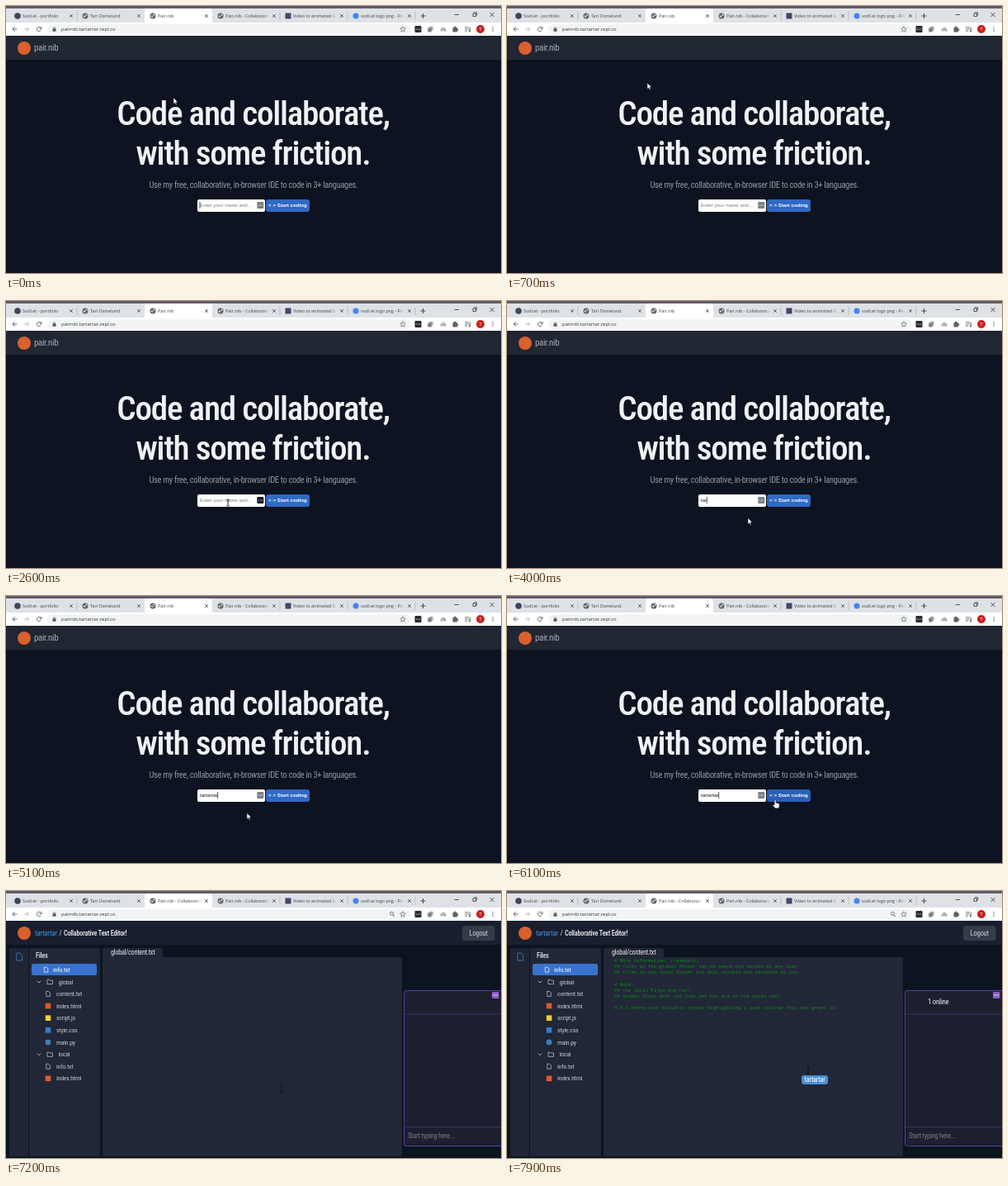
Animation, 600 px wide and 323 px high, one loop 8000 ms. Source, as an HTML page with a canvas:

```html
<!DOCTYPE html>
<html lang="en">
<head>
<meta charset="utf-8">
<title>Browser demo</title>
<style>
html, body { margin: 0; width: 100%; height: 100%; overflow: hidden; background: #0e1321; }
canvas { display: block; width: 600px; height: 323px; }
</style>
</head>
<body>
<canvas id="stage"></canvas>
<script>
const W = 600, H = 323, LOOP = 8000;
const BAR_Y = 20, PAGE_Y = 36;
const OPEN_AT = 7200, LOAD_AT = 6600, TYPE_AT = 3700, KEY_MS = 150;
const USER = 'tartartar', HOST = 'pairnib.' + USER + '.repl.co';
const UI = '"Open Sans", "Noto Sans", sans-serif';
const SANS = '"Liberation Sans", Arial, sans-serif';
const MONO = '"Liberation Mono", monospace';
const NARROW = '"Roboto Condensed", Roboto, sans-serif';
const TITLE = ['Code and collaborate,', 'with some friction.'];

const cv = document.getElementById('stage');
const dpr = window.devicePixelRatio || 1;
cv.width = W * dpr;
cv.height = H * dpr;
const c = cv.getContext('2d');

// time, x, y of the pointer
const PATH = [
  [0, 203, 111], [300, 203, 111], [1100, 137, 75], [1700, 137, 75],
  [2400, 269, 244], [2800, 269, 244], [3200, 292, 262.5], [5600, 292, 262.5],
  [5800, 296, 266], [6250, 334, 239.3], [7200, 334, 239.3], [7800, 365, 217]
];

function box(x, y, w, h, color, r = 0) {
  c.fillStyle = color;
  c.beginPath();
  c.roundRect(x, y, w, h, r);
  c.fill();
}

function disc(x, y, r, color) {
  c.fillStyle = color;
  c.beginPath();
  c.arc(x, y, r, 0, 7);
  c.fill();
}

// pts: flat x, y list
function line(pts, color, w = 0.9, close = false) {
  c.beginPath();
  for (let i = 0; i < pts.length; i += 2) c.lineTo(pts[i], pts[i + 1]);
  if (close) c.closePath();
  c.strokeStyle = color;
  c.lineWidth = w;
  c.stroke();
}

function ring(x, y, r, color, w = 0.9, from = 0, to = 7) {
  c.beginPath();
  c.arc(x, y, r, from, to);
  c.strokeStyle = color;
  c.lineWidth = w;
  c.stroke();
}

function text(s, x, y, size, color, family = UI, weight = 400, align = 'left') {
  c.font = `${weight} ${size}px ${family}`;
  c.textAlign = align;
  c.fillStyle = color;
  c.fillText(s, x, y);
}

function narrow(s, x, y, size, color, weight = 400, align = 'left') {
  const px = size * narrowScale;
  c.fontStretch = 'semi-condensed';
  c.letterSpacing = -0.03 * px + 'px';
  text(s, x, y, px, color, NARROW, weight, align);
  c.letterSpacing = '0px';
  c.fontStretch = 'normal';
}

// Font size factor for whichever narrow face is available.
function measureNarrow() {
  c.fontStretch = 'semi-condensed';
  c.font = `500 100px ${NARROW}`;
  const em = c.measureText(TITLE[0]).width / 100 - 0.03 * TITLE[0].length;
  c.fontStretch = 'normal';
  return 332 / em / 42;
}
let narrowScale = 1;

function cross(x, y, r, color, w) {
  line([x - r, y - r, x + r, y + r], color, w);
  line([x + r, y - r, x - r, y + r], color, w);
}

function dots(x, y, gap, color, r = 0.7) {
  for (let i = -1; i < 2; i++) disc(x + i * gap, y, r, color);
}

function globe(x, y) {
  disc(x, y, 3.5, '#5f6368');
  c.fillStyle = '#dfe2e6';
  c.beginPath();
  c.ellipse(x - 1.1, y + 0.6, 1.5, 0.9, 0.6, 0, 7);
  c.ellipse(x + 1.3, y - 1.2, 1.2, 0.8, 0.5, 0, 7);
  c.fill();
}

function tab(i, title, t) {
  const x = 82 * i, active = i === 2;
  const bg = active ? '#ffffff' : '#dee1e6';
  const loading = active && t >= LOAD_AT && t < OPEN_AT;
  if (active) box(168, 3, 82, BAR_Y - 2, bg, [3, 3, 0, 0]);
  if (loading) {
    const a = t / 130;
    ring(x + 14, 12, 3.2, '#6a62c8', 1, a, a + 3.6);
  } else if (i === 0) disc(14, 12, 3.8, '#3b4658');
  else if (i === 4) box(x + 10.5, 8.5, 7, 7, '#45456a');
  else if (i === 5) disc(x + 14, 12, 3.5, '#4285f4');
  else globe(x + 14, 12);
  c.save();
  c.beginPath();
  c.rect(x + 19, 4, 54, 15);
  c.clip();
  text(title, x + 20, 13.8, 5.4, '#3f4347');
  const fade = c.createLinearGradient(x + 66, 0, x + 73, 0);
  fade.addColorStop(0, bg + '00');
  fade.addColorStop(1, bg);
  c.fillStyle = fade;
  c.fillRect(x + 66, 4, 7, 15);
  c.restore();
  cross(x + 79, 12, 1.8, '#3c3f43', 0.8);
  if (i !== 1 && i !== 2) line([x + 86, 7, x + 86, 17], '#a3a6ab', 0.6);
}

function star(x, y) {
  const p = [];
  for (let i = 0; i < 10; i++) {
    const a = i * Math.PI / 5 - Math.PI / 2, r = i % 2 ? 1.6 : 3.5;
    p.push(x + r * Math.cos(a), y + r * Math.sin(a));
  }
  line(p, '#5f6368', 0.7, true);
}

function chrome(t) {
  const gray = '#55595e', open = t >= OPEN_AT;
  box(0, 0, W, BAR_Y, '#dee1e6');
  box(0, 0, W, 3, '#5f5c68');
  box(0, BAR_Y, W, PAGE_Y - BAR_Y, '#ffffff');
  const page = 'Pair.nib - Collaborative Text';
  const current = open ? page : t >= LOAD_AT ? 'https://' + HOST : 'Pair.nib';
  ['Sodl.et - portfolio', 'Tari Osmelund', current, page,
    'Video to animated G', 'sodl.et logo png - Find'].forEach((s, i) => tab(i, s, t));

  line([502.5, 12, 508.5, 12], '#44474b', 1);
  line([505.5, 9, 505.5, 15], '#44474b', 1);
  line([543.5, 10.5, 549, 10.5], '#333333', 0.8);
  line([566, 9, 569.5, 9, 569.5, 12.5, 566, 12.5], '#333333', 0.8, true);
  line([567, 7.8, 570.7, 7.8, 570.7, 11.5], '#333333', 0.7);
  cross(589, 10.5, 2.5, '#333333', 0.8);

  line([13.5, 28, 8, 28], gray);
  line([10.7, 25.3, 8, 28, 10.7, 30.7], gray);
  line([22, 28, 27.5, 28], '#b4b7bb');
  line([24.8, 25.3, 27.5, 28, 24.8, 30.7], '#b4b7bb');
  if (t >= LOAD_AT && t < OPEN_AT) cross(40, 28, 2.5, gray);
  else {
    ring(40, 28, 2.6, gray, 0.9, 0.5, 5.6);
    line([43, 25, 43, 27.5, 40.6, 27.5], gray);
  }

  box(50, 22.2, 441, 11.6, '#f1f3f4', 6);
  box(56.5, 27.2, 4, 3.6, gray, 0.4);
  ring(58.5, 27.2, 1.3, gray, 0.7, Math.PI, 2 * Math.PI);
  text(HOST, 67, 30.2, 6, '#2d3034');
  if (open) {
    ring(467.5, 27.3, 2, gray, 0.8);
    line([469, 29, 471, 31], gray);
  }
  star(481, 28.2);

  box(495.5, 24, 8, 8, '#2a2a33', 1);
  dots(499.5, 28, 2, '#ffffff', 0.6);
  box(513, 24.8, 4.6, 5, '#a4a8ad', 0.6);
  box(511.2, 26.4, 4.6, 5, '#7d8288', 0.6);
  disc(528, 29, 1.8, '#b4b7bb');
  disc(530.2, 27.8, 2.2, '#b4b7bb');
  disc(532, 29.2, 1.6, '#a6aaaf');
  box(541.5, 26, 5.5, 5.5, '#5f6368', 0.6);
  disc(544.2, 25.8, 1.2, '#5f6368');
  disc(547.2, 28.6, 1.2, '#5f6368');
  for (let i = 0; i < 3; i++) line([556, 25.8 + i * 2.2, i < 2 ? 561.5 : 559, 25.8 + i * 2.2], gray, 0.8);
  line([562.5, 26, 562.5, 30.5], gray, 0.8);
  disc(561.7, 30.4, 1, gray);
  disc(575, 28, 5, '#c5221f');
  text('T', 575, 30.1, 5.6, '#ffffff', UI, 400, 'center');
  for (let i = -1; i < 2; i++) disc(590, 28 + i * 2.2, 0.7, gray);
}

function header(color) {
  box(0, PAGE_Y, W, 65 - PAGE_Y, color);
  disc(22, 51, 8, '#d9602f');
}

const inside = (p, x, w) => p.x >= x && p.x <= x + w && p.y >= 234 && p.y <= 249;

function caretOn(t) {
  if (t >= LOAD_AT - 100) return false;
  const end = TYPE_AT + 8 * KEY_MS;
  if (t >= TYPE_AT && t < end) return true;
  return (t < TYPE_AT ? t + 300 : t - end) % 1060 < 530;
}

function home(t, p) {
  box(0, PAGE_Y, W, H, '#0e1321');
  header('#212633');
  narrow('pair.nib', 34, 54.3, 11.1, '#a3a8b1');
  TITLE.forEach((s, i) => narrow(s, 299.5, 144 + 48 * i, 41.8, '#eff1f3', 500, 'center'));
  narrow('Use my free, collaborative, in-browser IDE to code in 3+ languages.',
    300, 220, 10.65, '#9196a0', 400, 'center');

  const typed = USER.slice(0, Math.max(0, Math.floor((t - TYPE_AT) / KEY_MS) + 1));
  box(232, 234, 82, 15, '#ffffff', 2);
  text(typed || 'Enter your name and...', 235, 243.2, 6.2, typed ? '#151515' : '#7b7b7b', SANS);
  if (caretOn(t)) {
    const cx = 235 + (typed ? c.measureText(typed).width : 0);
    line([cx, 237, cx, 245], '#111111', 0.7);
  }
  box(304.3, 237, 8, 8, inside(p, 232, 82) ? '#15151c' : '#7c7f83', 1);
  dots(308.3, 241, 2, '#ffffff', 0.6);

  box(315, 234, 53, 15, inside(p, 315, 53) ? '#2a5fb6' : '#2f69c5', 3);
  text('< > Start coding', 341.5, 243.2, 6.2, '#ffffff', SANS, 700, 'center');
}

function fileIcon(x, y, color, s = 1) {
  line([x - 2.2 * s, y - 3 * s, x + 0.7 * s, y - 3 * s, x + 2.3 * s, y - 1.3 * s,
    x + 2.3 * s, y + 3 * s, x - 2.2 * s, y + 3 * s], color, 0.8, true);
}

const TREE = [
  ['info.txt', 'top'], ['global', 'dir'], ['content.txt', 'file'], ['index.html', '#e2592c'],
  ['script.js', '#efcf3c'], ['style.css', '#2f7fd0'], ['main.py', '#3d7fb5'],
  ['local', 'dir'], ['info.txt', 'file'], ['index.html', '#e2592c']
];

function tree() {
  narrow('Files', 36, 81, 8.4, '#dfe1e6', 500);
  box(31, 88, 79, 14, '#3a72cc', 2.5);
  TREE.forEach(([name, kind], i) => {
    const y = 95.2 + 14.62 * i;
    let x = 61;
    if (kind === 'top') {
      fileIcon(48.5, y, '#e8edf6');
      x = 57;
    } else if (kind === 'dir') {
      line([37.8, y - 1, 40, y + 1.2, 42.2, y - 1], '#b9bdc6', 0.9);
      line([50, y - 2.5, 52.5, y - 2.5, 53.4, y - 1.5, 56.4, y - 1.5, 56.4, y + 2.8, 50, y + 2.8],
        '#b9bdc6', 0.8, true);
      x = 63.5;
    } else if (kind === 'file') fileIcon(51, y, '#b9bdc6');
    else if (name === 'main.py') disc(51, y, 3.4, kind);
    else box(47.8, y - 3.3, 6.5, 6.6, kind);
    narrow(name, x, y + 2.7, 8, kind === 'top' ? '#ffffff' : '#c3c6ce');
  });
}

const DOC = [
  '# More information: (readonly)',
  '## files in the global folder can be seend and edited by any user.',
  '## files in the local folder are only visible and editable by you.',
  '',
  '# Note:',
  '## the local files now run!',
  '## global files dont run just yet but are in the works now!',
  '',
  '# P.S there isnt actually syntax highlighting i just colored this doc green lol'
];

function editor(t, p) {
  box(0, PAGE_Y, W, H, '#0c1420');
  header('#191f2e');
  narrow(USER, 35, 54, 9, '#428fdc');
  narrow('/', 64.5, 54, 9, '#c9ccd2');
  narrow('Collaborative Text Editor!', 70, 53.8, 8.4, '#eceef1', 500);
  box(553, 42, 39.5, 18, '#353b47', 3);
  narrow('Logout', 572.7, 54, 8.8, '#c9ccd2', 400, 'center');

  box(4, 69, 23, 252, '#1f2534', 2);
  fileIcon(16, 79.5, '#3d7fd0', 1.5);
  box(28, 69, 86, 252, '#212737', 2);
  tree();

  box(117, 80, 363, 241, '#212737', 2);
  box(117, 69, 73, 13, '#212737', [3, 3, 0, 0]);
  narrow('global/content.txt', 127, 77.3, 8.3, '#e4e6ea');
  if (t >= 7400) DOC.forEach((s, i) => text(s, 130, 86 + 7.17 * i, 5.7, '#0b920f', MONO));

  box(482, 120, 125, 189, '#1b1f2e', 3);
  c.strokeStyle = '#5a3da6';
  c.lineWidth = 1;
  c.beginPath();
  c.roundRect(482.5, 120.5, 125, 188, 3);
  c.stroke();
  line([483, 149, W, 149], '#43357a', 0.8);
  line([483, 285.5, W, 285.5], '#43357a', 0.8);
  if (t >= 7500) narrow('1 online', 510, 137, 9, '#e9ebef');
  box(589, 122, 8.5, 8, '#8d5cc4', 1);
  dots(593.2, 126, 2.1, '#ffffff', 0.7);
  narrow('Start typing here...', 487, 299, 8.6, '#757a88');

  if (t >= 7500) {
    box(p.x - 8, p.y + 6, 32, 11, '#4a8fd6', 3);
    narrow(USER, p.x + 8, p.y + 14.2, 8.4, '#ffffff', 400, 'center');
  }
}

function pointer(t) {
  let i = 0;
  while (i < PATH.length - 2 && t >= PATH[i + 1][0]) i++;
  const [t0, x0, y0] = PATH[i], [t1, x1, y1] = PATH[i + 1];
  const u = Math.min(1, (t - t0) / (t1 - t0)), e = u * u * (3 - 2 * u);
  return { x: x0 + (x1 - x0) * e, y: y0 + (y1 - y0) * e };
}

const ARROW = [[0, 0], [0, 7.4], [1.7, 5.9], [2.9, 8.6], [4.1, 8.1], [2.9, 5.4], [5.2, 5.2]];
const HAND = [[0, 0.8], [0.9, 0], [1.8, 0.8], [1.8, 3.8], [5.6, 4.8], [6.1, 6], [5.4, 10.6],
  [0.8, 10.6], [-2, 6.8], [-1.2, 5.8], [0, 6.8]];

function shape(pts, x, y) {
  c.beginPath();
  pts.forEach(([a, b]) => c.lineTo(x + a, y + b));
  c.closePath();
  c.fillStyle = '#ffffff';
  c.fill();
  c.strokeStyle = '#1b1f26';
  c.lineWidth = 0.55;
  c.stroke();
}

function beam(x, y) {
  line([x, y - 3.6, x, y + 3.6], '#0a0a0c', 0.9);
  line([x - 1.8, y - 3.8, x + 1.8, y - 3.8], '#0a0a0c', 0.8);
  line([x - 1.8, y + 3.8, x + 1.8, y + 3.8], '#0a0a0c', 0.8);
}

function draw(t) {
  const p = pointer(t), open = t >= OPEN_AT;
  c.setTransform(dpr, 0, 0, dpr, 0, 0);
  narrowScale = measureNarrow();
  (open ? editor : home)(t, p);
  chrome(t);
  if (open || inside(p, 232, 82)) beam(p.x, p.y);
  else shape(inside(p, 315, 53) ? HAND : ARROW, p.x, p.y);
}

const start = performance.now();
function tick() {
  const t = (performance.now() - start) % LOOP;
  draw(Math.floor(t / 100) * 100);
  requestAnimationFrame(tick);
}
tick();
</script>
</body>
</html>
```
